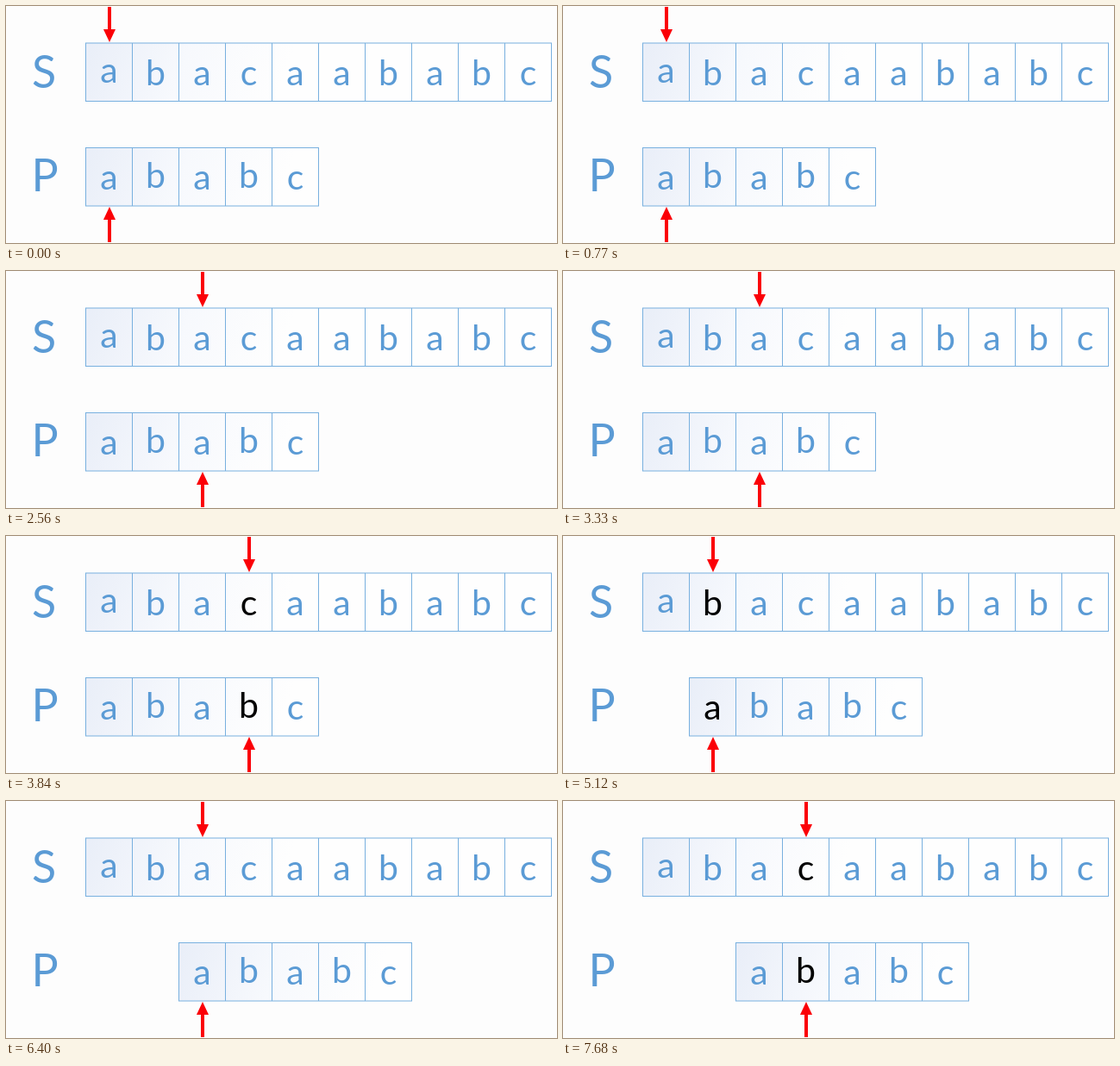
Animation of 639 by 275 pixels, one loop 8 s. Source, as an HTML page with a canvas:

```html
<!DOCTYPE html>
<html lang="en">
<head>
<meta charset="utf-8">
<title>String matching</title>
<style>
html, body { margin: 0; width: 100%; height: 100%; overflow: hidden; background: #fdfdfd; }
canvas { display: block; }
</style>
</head>
<body>
<canvas id="stage" width="639" height="275"></canvas>
<script>
const ctx = document.getElementById('stage').getContext('2d');
const CELL = 54, LEFT = 92.5, HEIGHT = 67.5;
const STEP = 1280, LOOP = 8000;
const BLUE = '#5b9bd5', RED = '#fb0007';
const FONT = 'Lato, Carlito, sans-serif';
const TEXT = 'abacaababc', PATTERN = 'ababc';

// Each step: pattern shift, compared text index, whether the pair differs.
const steps = [
  [0, 0, false], [0, 1, false], [0, 2, false], [0, 3, true],
  [1, 1, true], [2, 2, false], [2, 3, true]
];

function label(char, x, y, size, color = BLUE) {
  ctx.font = `${size}px ${FONT}`;
  ctx.fillStyle = color;
  ctx.fillText(char, x, y);
}

function row(word, x, y, baseline, marked) {
  const width = word.length * CELL;
  const fill = ctx.createLinearGradient(x, y, x + 215, y + 80);
  fill.addColorStop(0, '#e9eef8');
  fill.addColorStop(0.5, '#f7f9fd');
  fill.addColorStop(1, '#fefefe');
  ctx.fillStyle = fill;
  ctx.fillRect(x, y, width, HEIGHT);
  ctx.strokeStyle = '#78b0df';
  ctx.lineWidth = 1;
  ctx.strokeRect(x, y, width, HEIGHT);
  ctx.beginPath();
  for (let i = 1; i < word.length; i++) {
    ctx.moveTo(x + i * CELL, y);
    ctx.lineTo(x + i * CELL, y + HEIGHT);
  }
  ctx.stroke();
  [...word].forEach((char, i) =>
    label(char, x + (i + 0.5) * CELL, baseline(char, i), 41, i === marked ? '#000' : BLUE));
}

function arrow(x, tip, dir) {
  ctx.fillStyle = RED;
  ctx.fillRect(x - 2, Math.min(tip - dir * 14, tip - dir * 41), 4, 27);
  ctx.beginPath();
  ctx.moveTo(x, tip);
  ctx.lineTo(x - 7, tip - dir * 15);
  ctx.lineTo(x + 7, tip - dir * 15);
  ctx.fill();
}

function draw(now) {
  const [shift, index, differs] = steps[Math.floor(now % LOOP / STEP)];
  ctx.fillStyle = '#fdfdfd';
  ctx.fillRect(0, 0, 639, 275);
  ctx.textAlign = 'center';
  label('S', 44, 95, 52);
  label('P', 45, 215, 52);
  row(TEXT, LEFT, 43, (char, i) => i ? 92 : 89, differs ? index : -1);
  row(PATTERN, LEFT + shift * CELL, 164.5, char => char === 'b' ? 211 : 213,
    differs ? index - shift : -1);
  const x = LEFT + (index + 0.5) * CELL + 0.5;
  arrow(x, 42, 1);
  arrow(x, 233, -1);
  requestAnimationFrame(draw);
}
requestAnimationFrame(draw);
</script>
</body>
</html>
```
